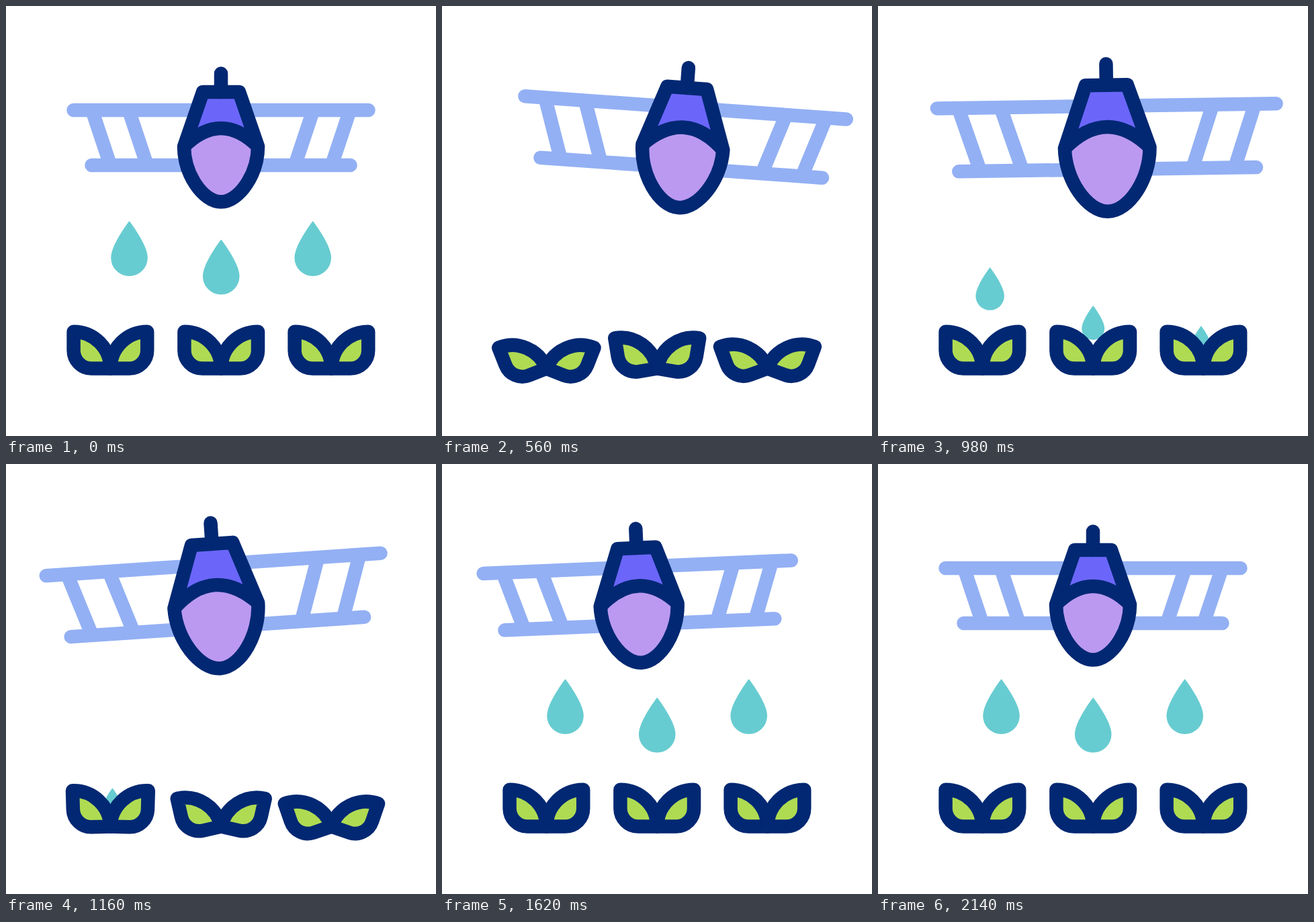
Recreate the animation shown at these times as an HTML page. Size 640 by 640 pixels, loop 2400 ms.

```html
<!DOCTYPE html>
<html lang="en">
<head>
<meta charset="utf-8">
<title>Crop duster</title>
<style>
  html, body { margin: 0; width: 100%; height: 100%; overflow: hidden; background: #fff; }
  svg { display: block; width: 100%; height: 100%; }
</style>
</head>
<body>
<svg viewBox="0 0 640 640" fill="none" stroke-width="20.5" stroke-linejoin="round">
  <defs>
    <path id="drop" fill="#67ccd1" d="M0-41C0-41-27.3-6-27.3 13.7A27.3 27.3 0 0 0 27.3 13.7C27.3-6 0-41 0-41Z"/>
    <path id="leaf" fill="#afdb53" stroke="#022873" d="M-54.8-54.8A54.8 54.8 0 0 1 0 0H-28A26.8 26.8 0 0 1-54.8-26.8Z"/>
    <path id="struts" d="M128 155L155.3 237M182.7 155L210 237"/>
  </defs>
  <g id="drops"></g>
  <g id="plants"></g>
  <g id="plane">
    <g stroke="#93b0f4">
      <path stroke-linecap="round" d="M100.5 155H539.5M127.5 237H512.5"/>
      <use href="#struts"/>
      <use href="#struts" transform="matrix(-1 0 0 1 640 0)"/>
    </g>
    <path fill="#6b66f9" d="M293 128H347L375 209Q320 155 265 209Z"/>
    <path fill="#bb99f1" d="M265 209Q320 155 375 209C375 250 347 291.5 320 291.5S265 250 265 209Z"/>
    <g stroke="#022873">
      <path d="M293 128H347L375 209C375 250 347 291.5 320 291.5S265 250 265 209Z"/>
      <path d="M265 209Q320 155 375 209"/>
      <path stroke-linecap="round" d="M320 100.5V128"/>
    </g>
  </g>
</svg>
<script>
const LOOP = 2400, LINE = 20.5, SOIL_Y = 532, RISE = 106, SHRINK = 0.62, BEND = 22, BEND_MS = 240;

const $ = id => document.getElementById(id);
const clamp = p => Math.max(0, Math.min(1, p));
const ease = p => (p = clamp(p), p * p * (3 - 2 * p));
const mix = (a, b, f) => a + (b - a) * f;

// Eased value along [time, value] keys
function track(t, keys) {
  let [t0, v0] = keys[0];
  for (const [t1, v1] of keys.slice(1)) {
    if (t < t1) return mix(v0, v1, ease((t - t0) / (t1 - t0)));
    [t0, v0] = [t1, v1];
  }
  return v0;
}

// first: end of the first fall; second: start and end of the next; last: return to rest
const columns = [
  { x: 183.5, y: 361, plantX: 155.4, first: 538, second: [538, 1320], last: [1320, 1546], hits: [300, 1120] },
  { x: 320.2, y: 388.5, plantX: 320.2, first: 457, second: [566, 1177], last: [1210, 1597], hits: [189, 1029] },
  { x: 456.7, y: 361, plantX: 484.4, first: 423, second: [595, 1092], last: [1190, 1618], hits: [280, 977] }
];

function use(parent, href) {
  const el = document.createElementNS("http://www.w3.org/2000/svg", "use");
  el.setAttribute("href", href);
  return parent.appendChild(el);
}

for (const c of columns) {
  c.drop = use($("drops"), "#drop");
  c.leaves = [use($("plants"), "#leaf"), use($("plants"), "#leaf")];
}

function dropPose(c, t) {
  const [s2, e2] = c.second, [s3, e3] = c.last;
  if (t < c.first) {
    const f = ease(t / c.first);
    return [mix(c.x, c.plantX, f), mix(c.y, SOIL_Y, f), 1 - SHRINK * f];
  }
  if (t >= s2 && t < e2) {
    const f = ease((t - s2) / (e2 - s2)), full = 0.375;
    const size = f < full ? f / full : 1 - SHRINK * (f - full) / (1 - full);
    return [mix(c.x, c.plantX, f), mix(c.y - RISE, SOIL_Y, f), size];
  }
  if (t >= s3) {
    const p = clamp((t - s3) / (e3 - s3));
    return [c.x, c.y - RISE * (1 - ease(p)), ease(1.46 * p)];
  }
  return [c.x, c.y, 0];
}

function draw(t) {
  const dx = track(t, [[0, 0], [720, 45], [1430, -33.5], [2135, 0]]);
  const tilt = track(t, [[0, 0], [620, 4.2], [1280, -4.6], [1990, 0]]);
  const size = track(t, [[0, 1], [970, 1.15], [1990, 1]]);
  $("plane").setAttribute("transform",
    `translate(${320 + dx} 196) rotate(${tilt}) scale(${size}) translate(-320 -196)`);
  // The plane grows but its lines keep their weight
  $("plane").setAttribute("stroke-width", LINE / size);

  for (const c of columns) {
    const [x, y, s] = dropPose(c, t);
    c.drop.setAttribute("transform", `translate(${x} ${y}) scale(${s})`);
    const bend = c.hits.reduce((sum, h) => sum + BEND * ease(1 - Math.abs(t - h - BEND_MS) / BEND_MS), 0);
    c.leaves.forEach((leaf, i) => leaf.setAttribute("transform",
      `translate(${c.plantX} 539.5) scale(${i ? -1 : 1} 1) rotate(${-bend})`));
  }
}

function frame() {
  draw(performance.now() % LOOP);
  requestAnimationFrame(frame);
}
frame();
</script>
</body>
</html>
```
